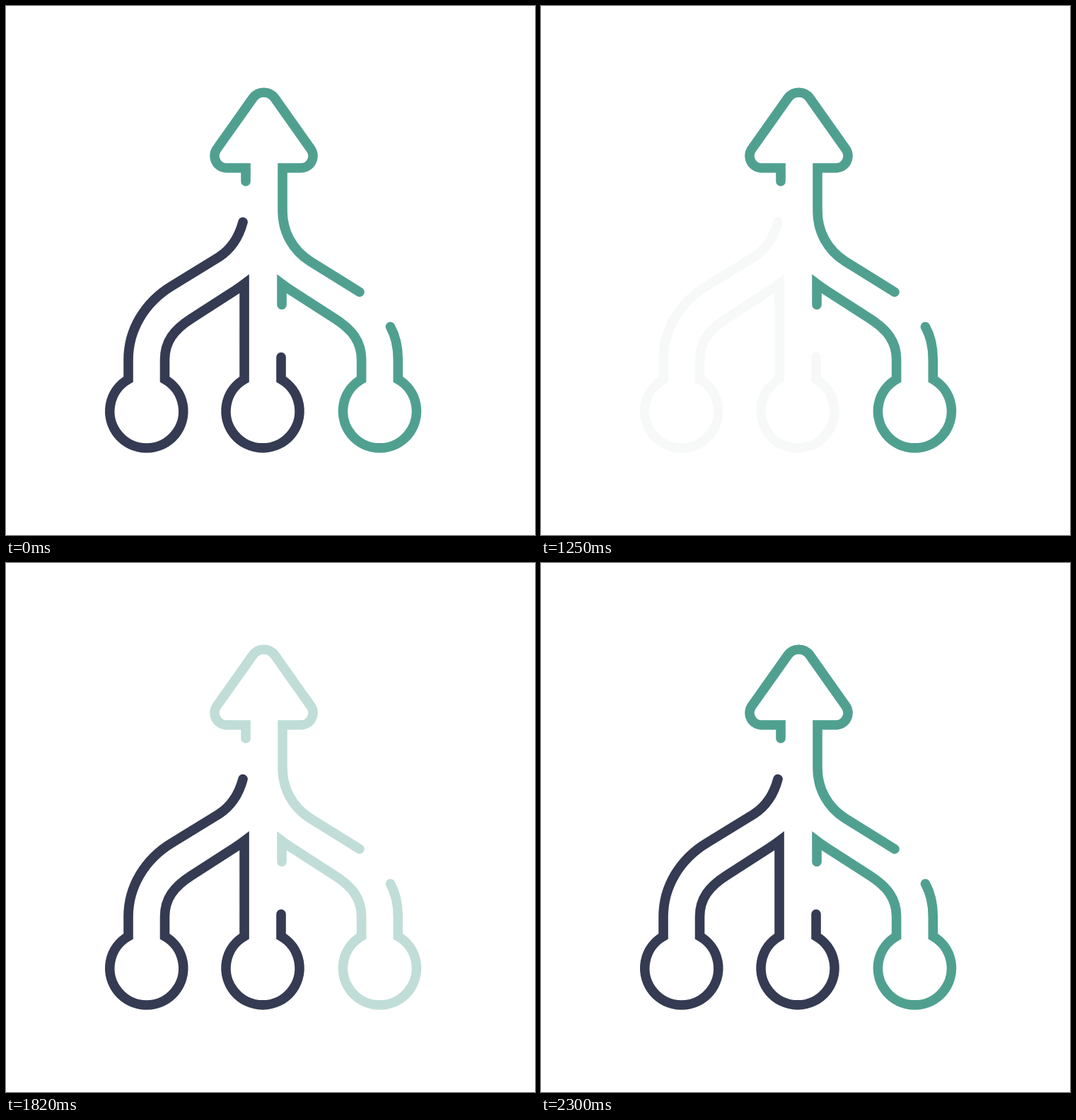
Recreate the animation shown at these times as an HTML page. Size 748 by 748 pixels, loop 4830 ms.

```html
<!DOCTYPE html>
<html lang="en">
<head>
<meta charset="utf-8">
<title>Merging arrow</title>
<style>
  html, body { margin: 0; width: 100%; height: 100%; overflow: hidden; background: #fff; }
  svg { display: block; width: 100%; height: 100%; }
  path { fill: none; stroke-width: 13.6; stroke-linecap: round; stroke-miterlimit: 10; }
  g { animation: blink 4830ms infinite; }
  .roots { stroke: #343b52; animation-delay: 770ms; }
  .arrow { stroke: #50a090; animation-delay: 1520ms; }

  /* Each segment advances in 30 ms ticks. */
  @keyframes blink {
    0% { opacity: 1; animation-timing-function: steps(1); }
    0.621% { opacity: .9; animation-timing-function: steps(4); }
    3.105% { opacity: .62; animation-timing-function: steps(11); }
    9.937% { opacity: .035; animation-timing-function: steps(2); }
    11.18% { opacity: .035; animation-timing-function: steps(4); }
    13.664% { opacity: .4; animation-timing-function: steps(4); }
    16.149%, 100% { opacity: 1; }
  }
</style>
</head>
<body>
<svg viewBox="0 0 748 748">
  <g class="roots">
    <path d="M335 305.5 C329 328 318 344 301 355 L235 395.5 C196 419 173 458 173 500
      V527.8 A52 52 0 1 0 224.5 527.8 V500 C224.5 475 237 458 262 442
      L323 402.7 Q330.5 398 337 393 V527.8 A52 52 0 1 0 389 527.8 V496.5"/>
  </g>
  <g class="arrow">
    <path d="M339 248 V229 H312 A17 17 0 0 1 298.1 202.2 L349 130.3 A19 19 0 0 1 380 130.3
      L430.9 202.2 A17 17 0 0 1 417 229 H391 V290 C391 319 405 345 430 361 L500 404.5"/>
    <path d="M543.5 453.5 C551 467 554.3 482 554.3 500 V527.8 A52 52 0 1 1 502.6 527.8
      V500 C502.6 475 490 458 465 442 L404 402.7 Q396.5 398 390 393 V422.5"/>
  </g>
</svg>
</body>
</html>
```
